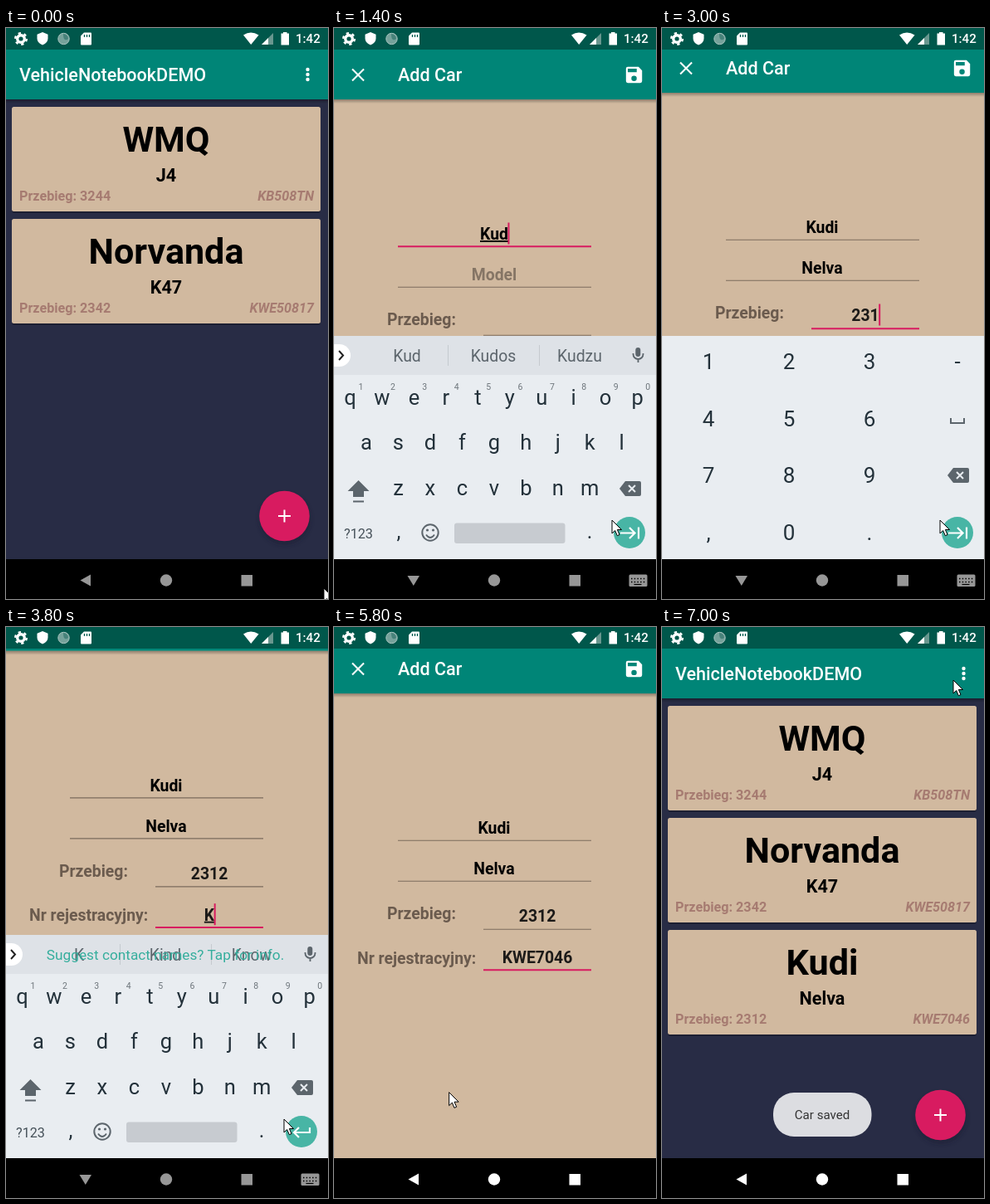
An HTML page for the animation above (7.1 s loop, 388 by 688 pixels).

```html
<!DOCTYPE html>
<html lang="en">
<head>
<meta charset="utf-8">
<title>Add Car</title>
<style>
html, body { margin: 0; width: 100%; height: 100%; overflow: hidden; background: #000; }
svg { display: block; width: 388px; height: 688px; font-family: Roboto, sans-serif; }
.b { font-weight: 700; }
.m { font-weight: 500; }
.mid { text-anchor: middle; }
.under { text-decoration: underline; text-decoration-thickness: 1px; }
</style>
</head>
<body>
<svg id="stage" viewBox="0 0 388 688" xmlns="http://www.w3.org/2000/svg"></svg>
<script>
const LOOP = 7100, STEP = 100;
const PINK = '#d81b60', TEAL = '#008577', SAND = '#d1b99f', INK = '#23313a', GREY = '#5c656c';

const text = (s, x, y, size, fill, cls = '', more = '') =>
  `<text x="${x}" y="${y}" font-size="${size}" fill="${fill}" class="${cls}" ${more}>${s}</text>`;
const rect = (x, y, w, h, fill, more = '') =>
  `<rect x="${x}" y="${y}" width="${w}" height="${h}" fill="${fill}" ${more}/>`;
const circle = (x, y, r, fill, more = '') =>
  `<circle cx="${x}" cy="${y}" r="${r}" fill="${fill}" ${more}/>`;
const path = (d, fill, more = '') => `<path d="${d}" fill="${fill}" ${more}/>`;
const line = (d, color, w = 2, more = '') =>
  `<path d="${d}" fill="none" stroke="${color}" stroke-width="${w}" ${more}/>`;
const group = (id, body, more = '') => `<g id="${id}" ${more}>${body}</g>`;

// Fields: text centre, baseline, underline, key press times and focus span
const fields = [
  { s: 'Kudi', hint: 'Brand', x: 193, y: 255, x1: 77, line: 263, from: 500, to: 1700, keys: [1200, 1300, 1400, 1600], ink: '#000' },
  { s: 'Nelva', hint: 'Model', x: 193, y: 304, x1: 77, line: 312, from: 1700, to: 2500, keys: [1900, 2000, 2200, 2300, 2400], ink: '#000' },
  { s: '2312', hint: '', x: 245, y: 361, x1: 180, line: 370, from: 2500, to: 3500, keys: [2700, 2900, 3000, 3200], ink: '#1c1a18' },
  { s: 'KWE7046', hint: '', x: 245, y: 411, x1: 180, line: 419, from: 3500, to: LOOP, keys: [3800, 4100, 4300, 4500, 4700, 4800, 4900], ink: '#1c1a18' }
];

const words = {
  K: ['K', 'Kind', 'Know'], Ku: ['Ku', 'Kudos', 'Kurt'], Kud: ['Kud', 'Kudos', 'Kudzu'], Kudi: ['Kudi', 'Kudos', 'Kudzu'],
  N: ['N', 'No', 'Not'], Ne: ['Ne', 'New', 'Need'], Nel: ['Nel', 'Next', 'Never'],
  Nelv: ['Nelv', 'Never', 'Nerves'], Nelva: ['Nelva', 'Nerve', 'Nerves']
};

function card(y, name, model, mileage, plate) {
  const soft = '#a67b71';
  return rect(7, y + 1, 372, 127, '#181b2c', 'rx="3" opacity=".7"') +
    rect(7, y, 372, 126, SAND, 'rx="2.5"') +
    text(name, 193, y + 54, 43.1, '#000', 'b mid') +
    text(model, 193, y + 89.5, 21.56, '#000', 'b mid') +
    text('Przebieg: ' + mileage, 16, y + 113, 16.17, soft, 'b') +
    text(plate, 371, y + 113, 16.17, soft, 'b', 'text-anchor="end" font-style="italic"');
}

function bar(title, x, icons) {
  return rect(0, 86, 388, 5, 'url(#shade)') + rect(0, 26, 388, 60, TEAL) +
    text(title, x, 64, 21.56, '#fff', 'm') + icons;
}

function listScreen() {
  const dots = [50, 56, 62].map(y => circle(363.5, y, 2.2, '#fff')).join('');
  return rect(0, 26, 388, 614, '#282c45') +
    card(95, 'WMQ', 'J4', 3244, 'KB508TN') +
    card(230, 'Norvanda', 'K47', 2342, 'KWE50817') +
    group('newCard', card(365, 'Kudi', 'Nelva', 2312, 'KWE7046')) +
    bar('VehicleNotebookDEMO', 16, dots) +
    circle(336, 592, 31, '#14172a', 'opacity=".35" filter="url(#blur)"') +
    circle(335.5, 588, 30.3, PINK) +
    circle(335.5, 588, 30.3, '#fff', 'id="press" opacity="0"') +
    line('M328 588h15M335.5 580.5v15', '#fff');
}

function formScreen() {
  const save = path('M17 3H5a2 2 0 0 0-2 2v14a2 2 0 0 0 2 2h14a2 2 0 0 0 2-2V7zM12 19a3 3 0 1 1 0-6 3 3 0 0 1 0 6zM15 9H5V5h10z',
    '#fff', 'fill-rule="evenodd" transform="translate(348.6 43.6) scale(1.078)"');
  const icons = line('M22 49.5l14 14M36 49.5l-14 14', '#fff', 2.1) +
    circle(361, 56, 18, '#fff', 'id="ripple" opacity="0"') + save;
  const label = '#6b5b4e';
  return rect(0, 26, 388, 720, SAND) +
    text('Przebieg:', 64, 358, 19.4, label, 'b') +
    text('Nr rejestracyjny:', 28, 411.5, 19.4, label, 'b') +
    fields.map((f, i) => `<line id="line${i}" x1="${f.x1}" x2="310"/>` +
      text('', f.x, f.y, 19.4, f.ink, 'b mid', `id="text${i}"`)).join('') +
    rect(0, 0, 2, 26, PINK, 'id="caret"') +
    bar('Add Car', 77, icons);
}

const backspace = (x, y) =>
  path(`M${x - 13} ${y}l7-9h17a2 2 0 0 1 2 2v14a2 2 0 0 1-2 2h-17z`, GREY) +
  line(`M${x - 2} ${y - 4}l8 8m0-8l-8 8`, '#e9edf1', 2);

function letterKeys() {
  const row = (s, x, y) => [...s].map((c, i) => text(c, x + 38.45 * i, y, 25.5, INK, 'mid')).join('');
  const digits = [...'1234567890'].map((c, i) => text(c, 32.5 + 38.4 * i, 436, 10.5, '#6d757b', 'mid')).join('');
  const mic = rect(363.3, 385, 6, 11, GREY, 'rx="3"') + line('M360.5 392v1a6 6 0 0 0 12 0v-1M366.5 399v4', GREY, 1.8);
  return rect(0, 371, 388, 47, '#dee2e7') +
    rect(-14, 381, 34, 27, '#fff', 'rx="13.5"') + line('M6 389l5 5.5-5 5.5', '#222', 2) + mic +
    group('dividers', line('M137.5 382v25M247.5 382v25', '#c5cacf', 1)) +
    [88, 192, 296].map((x, i) => text('', x, 402, 19.4, GREY, 'mid', `id="word${i}"`)).join('') +
    text('Suggest contact names? Tap for info.', 192, 401, 17.25, '#35ae9d', 'mid', 'id="tip"') +
    row('qwertyuiop', 19.5, 454) + digits + row('asdfghjkl', 39, 508) + row('zxcvbnm', 77.5, 563) +
    path('M29.5 545l13 13h-6.5v7h-13v-7h-6.500z', GREY) + rect(23, 569.5, 13, 2, GREY) + backspace(357, 555) +
    text('?123', 29.5, 614.5, 16.2, '#465159', 'mid') + text(',', 78, 615, 25, INK, 'mid') + text('.', 308, 615, 25, INK, 'mid') +
    circle(116, 608, 9.7, 'none', `stroke="${GREY}" stroke-width="2"`) +
    circle(112.5, 605, 1.6, GREY) + circle(119.5, 605, 1.6, GREY) + line('M111 610.500q5 7 10 0', GREY, 1.8) +
    rect(145, 596.5, 133.500, 24.5, '#c7cbd0', 'rx="3"');
}

function numberKeys() {
  const key = (c, x, y) => text(c, x, y + 9, 26, INK, 'mid');
  const rows = ['123', '456', '789', ',0.'];
  return rows.map((r, j) => [...r].map((c, i) => key(c, 56 + 97 * i, 402 + 68.7 * j)).join('')).join('') +
    key('-', 356, 402) + line('M348 470v6h16v-6', GREY) + backspace(357, 539);
}

function keyboard() {
  return rect(0, 371, 388, 269, '#e9edf1') + group('letters', letterKeys()) + group('numbers', numberKeys()) +
    circle(356, 608, 19, '#48b5a5') +
    group('next', line('M345 608.500h17M356 602l6.500 6.500-6.500 6.500M367 601.500v14', '#fff', 2.2)) +
    group('enter', line('M366 603v6h-19M353 603l-6 6 6 6', '#fff', 2.2));
}

function statusBar() {
  return rect(0, 0, 388, 26, '#00574b') +
    circle(18, 13, 4.3, 'none', 'stroke="#fff" stroke-width="3.4"') +
    circle(18, 13, 6.8, 'none', 'stroke="#fff" stroke-width="2.4" stroke-dasharray="3.300 3.820"') +
    path('M44 5l6.500 2.800v4.700q0 5.500-6.500 8-6.500-2.500-6.500-8V7.800z', '#fff') +
    circle(69.5, 13, 6.7, '#76a29b', 'stroke="#a9c5c0" stroke-width="1"') + path('M69 7a6 6 0 0 1 6 6q-2 2-4 1t-2-7', '#47827a') +
    path('M94 5.500h8a1 1 0 0 1 1 1v13a1 1 0 0 1-1 1H91a1 1 0 0 1-1-1V9.500z', '#fff') +
    line('M94.500 8v3M97.500 8v3M100.500 8v3', '#00574b', 1.3) +
    path('M286 8.500q9-6 18.500 0L295.200 20z', '#fff') +
    path('M308 20L322 6v14z', '#69978f') + path('M308 20l8-8v8z', '#fff') +
    path('M334 5h4.500v1.600h2.500v13.900h-9.500V6.600h2.500z', '#fff') +
    text('1:42', 349, 18.3, 15.1, '#fff', 'm');
}

function navBar() {
  const holes = line('M358 663.500h17M358 667.500h17', '#000', 1.5, 'stroke-dasharray="1.500 2.200"') + line('M361.500 670.500h9', '#000', 1.2);
  return rect(0, 640, 388, 48, '#000') +
    group('navIcons',
      '<path id="back" d="M89.500 665.500l12.500-7v14z"/><path id="down" d="M88.500 660h14.500l-7.200 12z"/>' +
      '<circle cx="193" cy="665.500" r="7.200"/><rect x="283.500" y="659" width="13.500" height="13.500"/>' +
      group('kbIcon', '<rect x="355.500" y="658.500" width="22" height="14.500" rx="1.500"/>' + holes));
}

document.getElementById('stage').innerHTML =
  '<defs><linearGradient id="shade" x2="0" y2="1"><stop stop-opacity=".32"/><stop offset="1" stop-opacity="0"/></linearGradient>' +
  '<filter id="blur" x="-20%" y="-20%" width="140%" height="140%"><feGaussianBlur stdDeviation="2.500"/></filter></defs>' +
  group('list', listScreen()) + group('form', formScreen()) + group('board', keyboard()) +
  group('toast', rect(134, 561, 118.5, 53, '#dcdde1', 'rx="25"') + text('Car saved', 193, 593.3, 15.1, '#333', 'mid')) +
  statusBar() + navBar() +
  group('mouse', path('M0 0v16l3.700-3.500 2.600 6.200 2.700-1.100-2.600-6.100h5.100z', '#fff', 'stroke="#000" stroke-width="1"'));

const el = {};
document.querySelectorAll('[id]').forEach(e => el[e.id] = e);
const set = (id, props) => { for (const k in props) el[id].setAttribute(k, props[k]); };
const show = (id, on) => set(id, { display: on ? 'inline' : 'none' });
const ramp = (t, a, b) => Math.min(1, Math.max(0, (t - a) / (b - a)));
const ease = p => p * p * (3 - 2 * p);
const out = p => 1 - Math.pow(1 - p, 2.2);
const between = (t, a, b) => t >= a && t < b;

const route = [
  [0, 383, 675], [400, 335, 593], [5000, 335, 593], [5400, 125, 677], [5500, 97, 662],
  [5700, 97, 662], [6300, 347, 54], [6600, 347, 54], [6900, 351, 64], [LOOP, 351, 64]
];

function mouseAt(t) {
  const i = Math.max(1, route.findIndex(r => t <= r[0]));
  const [t0, x0, y0] = route[i - 1], [t1, x1, y1] = route[i];
  const p = ramp(t, t0, t1);
  return [x0 + (x1 - x0) * p, y0 + (y1 - y0) * p];
}

function drawFields(t) {
  let typed = '';
  fields.forEach((f, i) => {
    const pressed = f.keys.filter(k => k <= t);
    const s = f.s.slice(0, pressed.length);
    const focus = between(t, f.from, f.to) || (i === 0 && t < f.from);
    const node = el['text' + i];
    node.textContent = s || f.hint;
    node.setAttribute('fill', s ? f.ink : '#857565');
    node.setAttribute('class', 'b mid' + (focus && /^[A-Za-z]+$/.test(s) ? ' under' : ''));
    set('line' + i, { y1: f.line + .2, y2: f.line + .2, stroke: focus ? PINK : '#7b6b5c', 'stroke-width': focus ? 2 : 1.1 });
    if (!focus) return;
    typed = s;
    const last = Math.max(f.from, ...pressed);
    const x = f.x + (s ? node.getComputedTextLength() / 2 : 0);
    set('caret', { x: x - .5, y: f.y - 20.5 });
    show('caret', Math.floor(Math.max(0, t - last) / 500) % 2 === 0);
  });
  return typed;
}

function draw(t) {
  const enter = ramp(t, 350, 650), leave = ramp(t, 6450, 6650);
  const pan = 8 * ease(ramp(t, 2450, 2650)) + 49.3 * ease(ramp(t, 3450, 3650)) - 57.3 * ease(ramp(t, 5600, 5850));
  const slide = 55 * (1 - out(enter)) + 55 * leave * leave;
  show('form', enter > 0 && leave < 1);
  set('form', { transform: `translate(0 ${slide - pan})`, opacity: Math.min(1, enter * 1.6) * (1 - leave) });
  const typed = drawFields(t);

  const up = out(ramp(t, 850, 1150)) - ease(ramp(t, 5550, 5800));
  const open = up > 0, numeric = between(t, 2600, 3500);
  show('board', open);
  set('board', { transform: `translate(0 ${269 * (1 - up)})` });
  show('letters', !numeric);
  show('numbers', numeric);
  show('next', t < 3500);
  show('enter', t >= 3500);
  const list = words[typed];
  for (let i = 0; i < 3; i++) el['word' + i].textContent = list ? list[i] : '';
  show('dividers', !!list);
  show('tip', between(t, 3600, 4300));

  show('newCard', t > 6400);
  set('newCard', { opacity: ramp(t, 6550, 6850) });
  set('toast', { opacity: ramp(t, 6600, 6900) });
  set('press', { opacity: between(t, 350, 700) ? .18 : 0 });
  set('ripple', { opacity: t >= 6300 ? .09 : 0 });

  set('navIcons', { fill: t < 5600 ? '#979797' : '#fff' });
  show('back', !open);
  show('down', open);
  show('kbIcon', open);
  set('mouse', { transform: `translate(${mouseAt(t)})` });
}

const start = performance.now();
function tick() {
  const t = (performance.now() - start + 4) % LOOP;
  draw(Math.floor(t / STEP) * STEP);
  requestAnimationFrame(tick);
}
tick();
</script>
</body>
</html>
```
